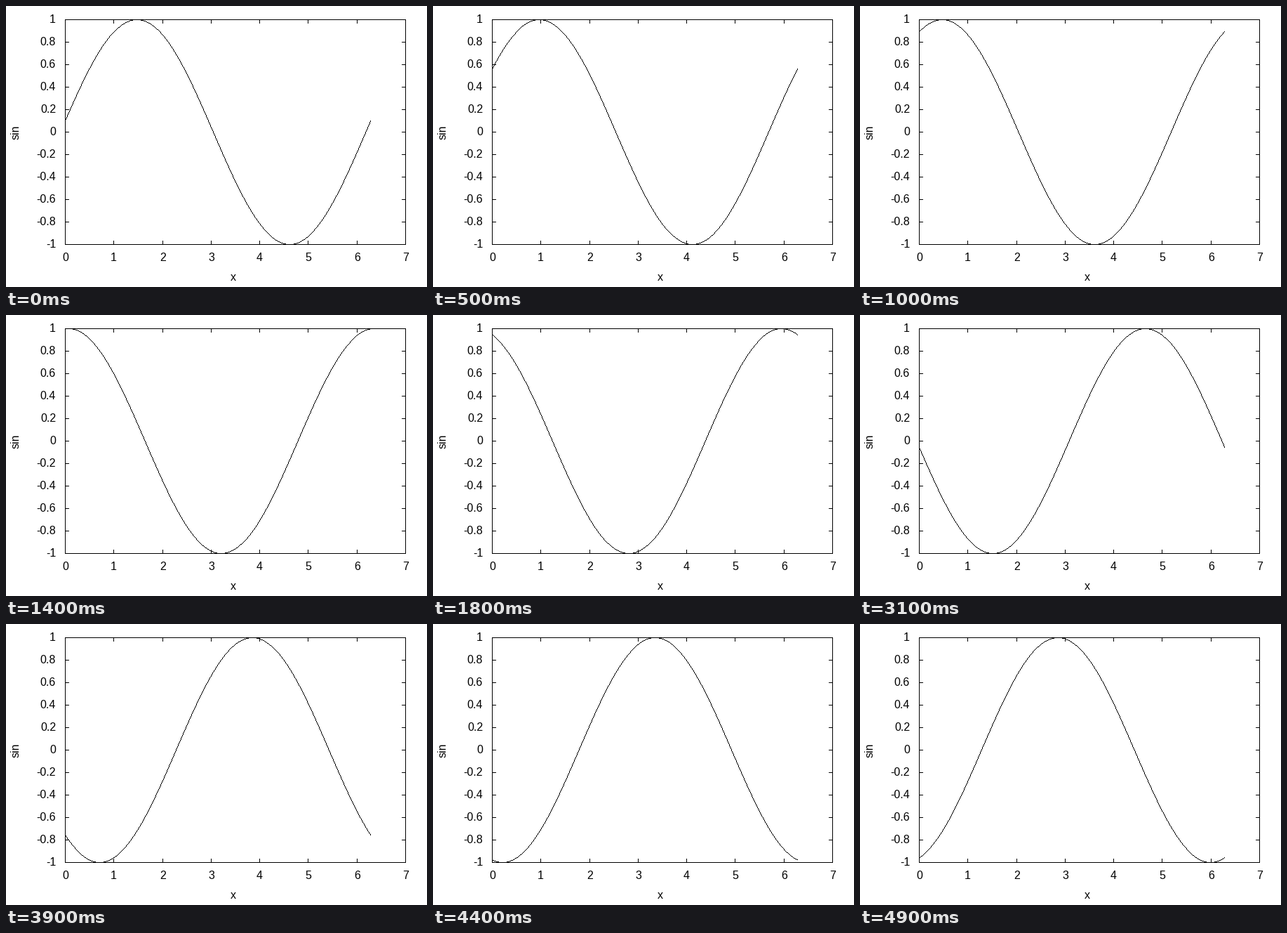
Animation of 600 by 400 pixels, one loop 5000 ms. Source, as a matplotlib script:

```python
import numpy as np
import matplotlib.pyplot as plt
from matplotlib.animation import FuncAnimation
from matplotlib.collections import PolyCollection

WIDTH, HEIGHT, DPI = 600, 400, 100
LEFT, RIGHT, TOP, BOTTOM = 84, 569, 19, 339
TICK = 5
FRAMES, INTERVAL = 50, 100

plt.rcParams["font.family"] = "Liberation Sans"
fig = plt.figure(figsize=(WIDTH / DPI, HEIGHT / DPI), dpi=DPI, facecolor="white")
ax = fig.add_axes([0, 0, 1, 1])
ax.set_xlim(0, WIDTH)
ax.set_ylim(HEIGHT, 0)
ax.axis("off")


def to_px(x, y):
    return LEFT + x / 7 * (RIGHT - LEFT), BOTTOM - (y + 1) / 2 * (BOTTOM - TOP)


def box(x0, y0, x1, y1):
    """Rectangle covering the whole pixels from (x0, y0) to (x1, y1)."""
    return [(x0, y0), (x1 + 1, y0), (x1 + 1, y1 + 1), (x0, y1 + 1)]


def add_boxes(boxes):
    shapes = PolyCollection(boxes, facecolors="black", edgecolors="none",
                            linewidths=0, snap=False)
    ax.add_collection(shapes, autolim=False)
    return shapes


def label(x, y, text, **kwargs):
    ax.text(x, y, text, fontsize=16 * 72 / DPI, color="black",
            va="baseline", **kwargs)


def curve_boxes(phase):
    """One-pixel-wide trace of sin(x + phase), stepping along the major axis."""
    x = np.linspace(0, 2 * np.pi, 4000)
    px, py = to_px(x, np.sin(x + phase))
    steps = np.maximum(np.abs(np.diff(px)), np.abs(np.diff(py)))
    travel = np.concatenate([[0], np.cumsum(steps)])
    stops = np.arange(0, travel[-1] + 0.5)
    cols = np.floor(np.interp(stops, travel, px) + 0.5)
    rows = np.floor(np.interp(stops, travel, py) + 0.5)
    corners = np.array(box(0, 0, 0, 0))
    return np.stack([cols, rows], axis=1)[:, None, :] + corners


frame_boxes = [
    box(LEFT, TOP, RIGHT, TOP), box(LEFT, BOTTOM, RIGHT, BOTTOM),
    box(LEFT, TOP, LEFT, BOTTOM), box(RIGHT, TOP, RIGHT, BOTTOM),
]
for i in range(8):
    x = round(to_px(i, 0)[0])
    frame_boxes += [box(x, TOP, x, TOP + TICK), box(x, BOTTOM - TICK, x, BOTTOM)]
    label(x + 0.5, 363, str(i), ha="center")
for i in range(-5, 6):
    y = round(to_px(0, i / 5)[1])
    frame_boxes += [box(LEFT, y, LEFT + TICK, y), box(RIGHT - TICK, y, RIGHT, y)]
    label(71, y + 5, f"{i / 5:g}", ha="right")
label(324, 391, "x", ha="center")
label(19, 180, "sin", ha="right", rotation=90, rotation_mode="default") if False else \
    ax.text(19, 180, "sin", fontsize=16 * 72 / DPI, color="black", rotation=90,
            rotation_mode="anchor", ha="center", va="baseline")

add_boxes(frame_boxes)
curve = add_boxes(curve_boxes(0.1))


def update(frame):
    curve.set_verts(curve_boxes(0.1 * (frame + 1)))
    return (curve,)


animation = FuncAnimation(fig, update, frames=FRAMES, interval=INTERVAL,
                          repeat=True, repeat_delay=0)
plt.show()
```
